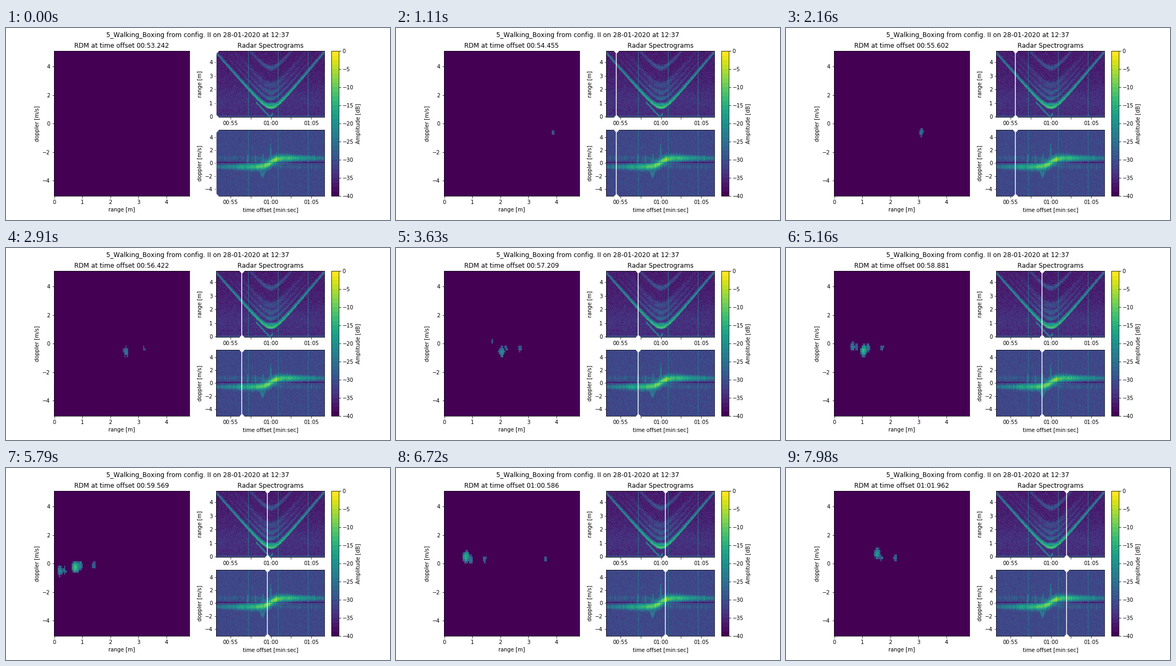
Recreate the animation shown at these times as a matplotlib script. Size 720 by 360 pixels, loop 8 s.

```python
import numpy as np
import matplotlib.pyplot as plt
from matplotlib.animation import FuncAnimation

W, H = 720, 360
T0, T1, DT = 53.24262, 66.64, 0.032783
R_MIN, R_MAX, V_MAX = -0.011, 4.82, 5.08
R_BINS, V_BINS, T_BINS = 108, 64, 203
LEVELS = dict(cmap=plt.get_cmap("viridis", 32), vmin=-40, vmax=0,
              aspect="auto", origin="lower", interpolation="nearest")

plt.rcParams["font.family"] = "DejaVu Sans"
plt.rcParams["text.kerning_factor"] = 6
fig = plt.figure(figsize=(W / 72, H / 72), dpi=72)


def box(left, top, right, bottom):
    return [left / W, 1 - bottom / H, (right - left) / W, (bottom - top) / H]


RDM_BOX = box(90, 43.2, 343.9, 315)
RANGE_BOX = box(394.4, 43.2, 597, 166.75)
DOPPLER_BOX = box(394.4, 191.45, 597, 315)
BAR_BOX = box(610, 43.2, 623.7, 315)


def centers(lo, hi, count):
    step = (hi - lo) / count
    return lo + step * (np.arange(count) + 0.5)


R = centers(R_MIN, R_MAX, R_BINS)
V = centers(-V_MAX, V_MAX, V_BINS)[:, None]
T = centers(T0, T1, T_BINS)


# The walker approaches, turns near t = 60 s and leaves a little faster
def body_r(t):
    speed = np.where(t < 60.05, 0.68, 0.71)
    return np.hypot(0.68, speed * (t - 60.05))


def body_v(t):
    return 0.07 + 0.65 * np.tanh((t - 60) / 0.8)


def hand_r(t):
    return abs(0.63 * (59.9 - t))


def hand_v(t):
    return 0.5 * np.cos(2 * np.pi * (t - 57.8) / 3.4)


def during(t, start, end, level):
    return np.where((t > start) & (t < end), level, -60)


def rdm_at(step):
    t = T0 + step * DT
    r, v = body_r(t), body_v(t)
    amp = -11 - 3.4 * abs(t - 59.8)
    punch = during(t, 57, 60.1, -20 - 4.5 * abs(t - 59.4))
    blobs = [(r, v, amp),
             (r + 0.15, 0.6 * v, amp - 9),
             (hand_r(t), hand_v(t), punch),
             (hand_r(t) + 0.15, hand_v(t), punch - 5),
             (r + 0.65, 0.6 * v, min(-27, amp - 8)),
             (r + 2.85, 0.3, -27.5 - 20 * abs(t - 60.6))]
    z = np.full((V_BINS, R_BINS), -60.0)
    for rc, vc, top in blobs:
        z = np.maximum(z, top - 1000 * (R - rc) ** 2 - 85 * (V - vc) ** 2)
    z += np.random.default_rng(step).normal(0, 1.5, z.shape)
    return np.where((z > -31) & (step > 0), z, -40)


def add_bursts(z):
    for burst in 57.23 + 3.7 * np.arange(3):
        col = int((burst - T0) / (T1 - T0) * T_BINS)
        z[:, col] = np.maximum(z[:, col], -25)


def range_map():
    rng = np.random.default_rng(4)
    r = R[:, None]
    main, near = body_r(T), abs(T - 60)
    amp = -11 - 2 * near
    z = -35 + 1.5 * np.exp(-(r - 1.2) ** 2) - 0.3 * r
    z = z + rng.normal(0, 1.3, (R_BINS, T_BINS))
    arcs = [(main, amp, 1100),
            (np.maximum(main, 0.93), during(T, 59, 60.8, -17), 900),
            (hand_r(T), during(T, 58.2, 60.3, -22), 1200),
            (main + 0.12, amp - 7, 500),
            (main + 0.65, -26 - 2 * near, 250),
            (main + 1.1, -28 - 2 * near, 120),
            (main + 1.6, -30 - 1.5 * near, 50),
            (main + 2.9, -28 - 1.8 * near, 160)]
    for rc, top, k in arcs:
        speckle = rng.normal(0, 1.8, z.shape)
        z = np.maximum(z, top + speckle - k * (r - rc) ** 2)
    z[:3] = np.maximum(z[:3], -31)
    add_bursts(z)
    return z


def doppler_map():
    rng = np.random.default_rng(9)
    mid = body_v(T)
    amp = -8 - 2.5 * abs(T - 60)
    z = -31 + rng.normal(0, 0.8, (V_BINS, T_BINS))
    for vc, top, k in [(mid, amp, 55), (mid, amp - 9, 12),
                       (-mid + 0.15, -29, 25)]:
        speckle = rng.normal(0, 2, T_BINS) + rng.normal(0, 1, z.shape)
        z = np.maximum(z, top + speckle - k * (V - vc) ** 2)

    # Punches are short upward spikes in a steady rhythm
    for when in 60 + 0.95 * np.arange(-3, 4):
        peak = 1.5 + 1.6 * (when == 60)
        edge = mid + (peak - mid) * np.exp(-((T - when) / 0.13) ** 2)
        fill = (V > mid) & (V < edge) & (abs(T - when) < 0.3)
        z = np.where(fill, np.maximum(z, -25), z)
    dip = mid - 1.4 * np.exp(-((T - 59) / 0.35) ** 2)
    z = np.maximum(z, during(T, 58.2, 59.8, -23) - 25 * (V - dip) ** 2)
    add_bursts(z)
    z[V_BINS // 2] -= 6
    return z


def clock(t, _=None):
    if abs(t / 5 - round(t / 5)) > 0.01:
        return ""
    return f"{int(t // 60):02d}:{int(t % 60):02d}"


def panel(place, extent, data, ylabel, yticks, **label):
    ax = fig.add_axes(place)
    im = ax.imshow(data, extent=extent, **LEVELS)
    ax.set_ylabel(ylabel, **label)
    ax.set_yticks(yticks)
    ax.spines[:].set_visible(False)
    return ax, im


def draw_static():
    speeds = range(-4, 5, 2)
    fig.suptitle("5_Walking_Boxing from config. II on 28-01-2020 at 12:37")
    rdm, _ = panel(RDM_BOX, (R_MIN, R_MAX, -V_MAX, V_MAX), rdm_at(0),
                   "doppler [m/s]", speeds)
    rdm.set_xticks(range(5))
    rdm.set_xlabel("range [m]")
    top, im = panel(RANGE_BOX, (T0, T1, R_MIN, R_MAX), range_map(),
                    "range [m]", range(5), labelpad=12.4)
    top.set_title("Radar Spectrograms")
    low, _ = panel(DOPPLER_BOX, (T0, T1, -V_MAX, V_MAX), doppler_map(),
                   "doppler [m/s]", speeds)
    low.set_xlabel("time offset [min:sec]")
    for ax in (top, low):
        ax.set_xticks(np.arange(55, 66, 2.5))
        ax.xaxis.set_major_formatter(clock)
    bar = fig.colorbar(im, cax=fig.add_axes(BAR_BOX),
                       ticks=range(-40, 1, 5))
    bar.set_label("Amplitude [dB]")


# Flatten everything that never changes into one background picture
draw_static()
fig.canvas.draw()
backdrop = np.array(fig.canvas.buffer_rgba())
fig.clear()
fig.figimage(backdrop, zorder=-1)


def overlay(place):
    return fig.add_axes(place, facecolor="none", xticks=[], yticks=[])


def cursor(place):
    ax = overlay(place)
    ax.set(xlim=(T0, T1), ylim=(0, 1))
    return ax.plot([T0, T0], [0, 1], color="white", marker="D",
                   clip_on=False, zorder=3)[0]


rdm_ax = overlay(RDM_BOX)
rdm_im = rdm_ax.imshow(rdm_at(0), extent=(R_MIN, R_MAX, -V_MAX, V_MAX),
                       **LEVELS)
rdm_ax.set(xticks=[], yticks=[])
title = rdm_ax.set_title("", y=1.0)
cursors = [cursor(RANGE_BOX), cursor(DOPPLER_BOX)]


def update(i):
    step = (2 * i + 1) // 3  # data advances every 30 ms
    t = T0 + step * DT
    minutes, ms = divmod(int(t * 1000), 60000)
    title.set_text(f"RDM at time offset {minutes:02d}:"
                   f"{ms // 1000:02d}.{ms % 1000:03d}")
    rdm_im.set_data(rdm_at(step))
    for line in cursors:
        line.set_xdata([t, t])
    return [title, rdm_im, *cursors]


anim = FuncAnimation(fig, update, frames=400, interval=20, repeat=True,
                     repeat_delay=0, blit=False)
plt.show()
```
